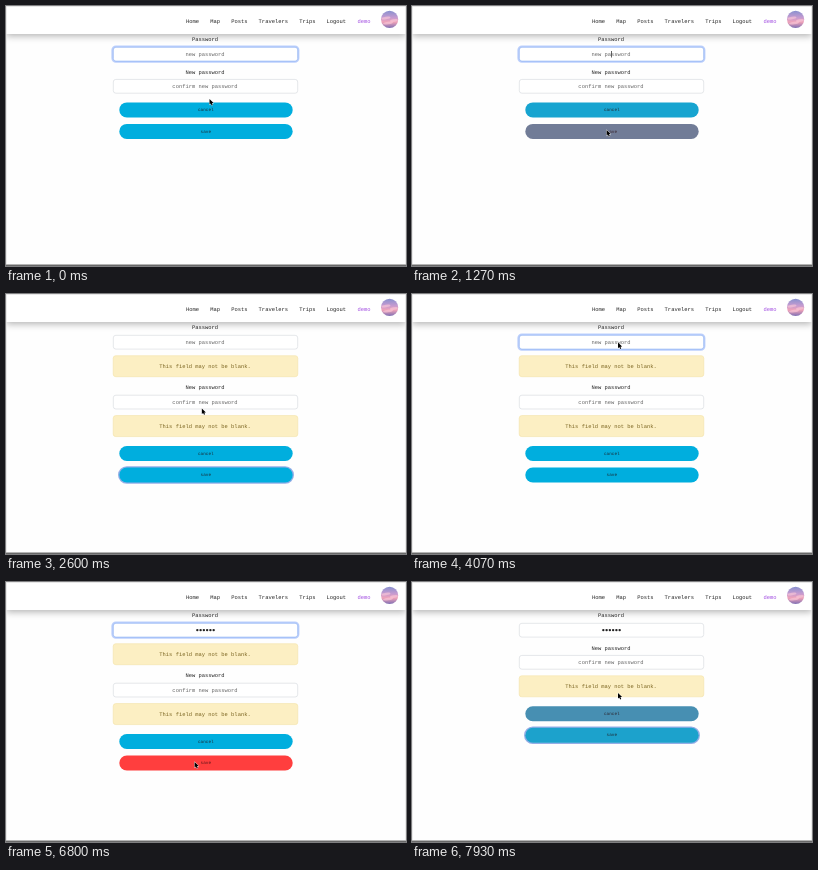
An HTML page with a canvas that plays this animation: 400 by 260 pixels, repeating every 8 s.

```html
<!DOCTYPE html>
<html lang="en">
<head>
<meta charset="utf-8">
<title>Change password</title>
<style>
  html, body { margin: 0; width: 100%; height: 100%; overflow: hidden; background: #fefefe; }
  canvas { display: block; width: 400px; height: 260px; }
</style>
</head>
<body>
<canvas id="stage"></canvas>
<script>
const canvas = document.getElementById('stage');
const ctx = canvas.getContext('2d');
const dpr = window.devicePixelRatio || 1;
canvas.width = 400 * dpr;
canvas.height = 260 * dpr;

const LOOP = 8000, TICK = 200 / 3, FADE = 150;
const MID = 199.5, CHAR = 3.27, ALERT_GAP = 27.8;
const BLUE = [0, 174, 222], RED = [255, 62, 62];
const FONT = '"Liberation Mono", "Courier New", monospace';

const NAV = [['Home', 180], ['Map', 204.3], ['Posts', 225.2], ['Travelers', 252.6],
  ['Trips', 293.2], ['Logout', 320.4], ['demo', 351.5]];

// time, x, y of the pointer tip
const POINTER = [
  [0, 203.5, 93], [920, 203.5, 93], [1080, 202, 102], [1260, 194.6, 124],
  [1730, 194.6, 122.4], [2560, 194.6, 122.4], [2930, 206, 48.6],
  [5760, 206, 48.6], [6060, 196.2, 157], [6270, 194, 162], [6600, 188.6, 180],
  [7500, 188.6, 180], [7900, 206, 111]
];
const KEYS = [4130, 4530, 4800, 5000, 5130, 5330];
const CARET = [[60, 530], [1060, 1590], [3130, 3660], [4130, 5790], [6260, 6790]];
const FIELD_FOCUS = [[-500, 1600], [3060, 7060]];
const SAVE_FOCUS = [[1600, 3060], [7060, 9000]];
const CANCEL_HOVER = [[1060, 1130], [6030, 6290], [7770, 7825]];
const SAVE_HOVER = [[1200, 1990], [6370, 7520], [7640, 7800]];

const clamp = v => Math.max(0, Math.min(1, v));
const inside = (spans, t) => spans.some(([a, b]) => t >= a && t < b);

function level(spans, t) {
  return Math.max(...spans.map(([a, b]) =>
    Math.min(clamp((t - a) / FADE), clamp((b - a) / FADE), clamp(1 - (t - b) / FADE))));
}

function mix(a, b, k) {
  return `rgb(${a.map((v, i) => Math.round(v + (b[i] - v) * k)).join(',')})`;
}

function pointerAt(t) {
  let i = 1;
  while (i < POINTER.length - 1 && t > POINTER[i][0]) i++;
  const [t0, x0, y0] = POINTER[i - 1], [t1, x1, y1] = POINTER[i];
  const k = clamp((t - t0) / (t1 - t0));
  return [x0 + (x1 - x0) * k, y0 + (y1 - y0) * k];
}

function box(x, y, w, h, r, fill, stroke, line = 0.6) {
  ctx.beginPath();
  ctx.roundRect(x, y, w, h, r);
  if (fill) {
    ctx.fillStyle = fill;
    ctx.fill();
  }
  if (stroke) {
    ctx.strokeStyle = stroke;
    ctx.lineWidth = line;
    ctx.stroke();
  }
}

function text(str, x, y, color, size = 5.45, align = 'center') {
  ctx.font = `${size}px ${FONT}`;
  ctx.textAlign = align;
  ctx.textBaseline = 'alphabetic';
  ctx.fillStyle = color;
  ctx.fillText(str, x, y);
}

function disc(x, y, r, color) {
  ctx.beginPath();
  ctx.arc(x, y, r, 0, Math.PI * 2);
  ctx.fillStyle = color;
  ctx.fill();
}

function avatar() {
  ctx.save();
  ctx.beginPath();
  ctx.arc(383.6, 13.4, 8.6, 0, Math.PI * 2);
  ctx.clip();
  const sky = ctx.createLinearGradient(0, 5, 0, 22);
  sky.addColorStop(0, '#8a91cf');
  sky.addColorStop(0.4, '#c79bd0');
  sky.addColorStop(0.65, '#f0a3b8');
  sky.addColorStop(1, '#7f70b4');
  ctx.fillStyle = sky;
  ctx.fillRect(374, 4, 20, 20);
  ctx.fillStyle = 'rgba(250,200,215,.65)';
  for (const [x, y, w] of [[380, 12, 4.5], [388, 14.5, 4], [382, 17, 5]]) {
    ctx.beginPath();
    ctx.ellipse(x, y, w, 1.3, -0.15, 0, Math.PI * 2);
    ctx.fill();
  }
  ctx.restore();
}

function header() {
  ctx.save();
  ctx.shadowColor = 'rgba(0,0,0,.3)';
  ctx.shadowBlur = 7 * dpr;
  ctx.shadowOffsetY = 2 * dpr;
  ctx.fillStyle = '#fff';
  ctx.fillRect(0, 0, 400, 28);
  ctx.restore();
  ctx.fillStyle = '#e2e2e2';
  ctx.fillRect(0, 0, 400, 0.8);
  NAV.forEach(([label, x], i) =>
    text(label, x, 17.3, i === NAV.length - 1 ? '#a04be0' : '#222', 5.45, 'left'));
  avatar();
}

function field(y, label, hint, focus, typed) {
  text(label, 199, y - 5.6, '#222');
  if (focus > 0) box(106.6, 40.6, 185.6, 15, 3.4, null, `rgba(120,160,250,${0.5 * focus})`, 2.4);
  box(107.3, y + 0.3, 184.4, 13.8, 2.6, '#fff',
    mix([212, 215, 220], [132, 170, 240], focus));
  for (let i = 0; i < typed; i++) {
    disc(MID + (i - (typed - 1) / 2) * CHAR, y + 7.1, 1.2, '#222');
  }
  if (!typed) text(hint, MID - 0.5, y + 8.9, '#666');
}

function alertBox(y) {
  box(107.2, y + 0.3, 184.6, 21, 2.6, '#fcefc3', '#f4e2a8');
  text('This field may not be blank.', 199, y + 12.5, '#7a6420');
}

function button(y, label, hover, focus) {
  if (focus > 0) box(112.9, y - 0.4, 174.2, 15.8, 7.9, null, `rgba(80,120,215,${0.6 * focus})`, 1.8);
  box(113.3, y, 173.4, 15, 7.5, mix(BLUE, RED, hover));
  text(label, 199.8, y + 8.7, mix([25, 45, 55], [90, 20, 25], hover), 4.35);
}

function pointer(x, y) {
  ctx.beginPath();
  [[0, 0], [0, 5.6], [1.3, 4.5], [2.2, 6.4], [3.2, 5.9], [2.4, 4.1], [4.1, 4]]
    .forEach(([dx, dy]) => ctx.lineTo(x + dx, y + dy));
  ctx.closePath();
  ctx.lineJoin = 'round';
  ctx.strokeStyle = 'rgba(255,255,255,.85)';
  ctx.lineWidth = 0.9;
  ctx.stroke();
  ctx.fillStyle = '#000';
  ctx.fill();
}

function draw(t) {
  const typed = KEYS.filter(k => t >= k - 5).length;
  const firstError = t >= 1990 && t < 7520;
  const secondError = t >= 1990;

  ctx.setTransform(dpr, 0, 0, dpr, 0, 0);
  ctx.textRendering = 'geometricPrecision';
  ctx.fillStyle = '#fefefe';
  ctx.fillRect(0, 0, 400, 260);

  header();

  let y = 41;
  field(y, 'Password', 'new password', level(FIELD_FOCUS, t), typed);
  if (inside(CARET, t)) {
    ctx.fillStyle = '#222';
    ctx.fillRect(MID - 0.4 + typed * CHAR / 2, 45, 0.7, 6.5);
  }
  if (firstError) {
    alertBox(61.4);
    y += ALERT_GAP;
  }
  y += 32.1;
  field(y, 'New password', 'confirm new password', 0, 0);
  if (secondError) {
    alertBox(y + 20.4);
    y += ALERT_GAP;
  }
  button(y + 23.3, 'cancel', level(CANCEL_HOVER, t), 0);
  button(y + 44.8, 'save', level(SAVE_HOVER, t), level(SAVE_FOCUS, t));

  ctx.fillStyle = '#dcdcdc';
  ctx.fillRect(0, 0, 0.6, 260);
  ctx.fillRect(399.4, 0, 0.6, 260);
  ctx.fillStyle = '#b5b5b5';
  ctx.fillRect(0, 258, 400, 1);
  ctx.fillStyle = '#686868';
  ctx.fillRect(0, 259, 400, 1);

  pointer(...pointerAt(t));
}

const start = performance.now();
function frame() {
  const t = (performance.now() - start) % LOOP;
  draw(Math.floor((t + 4) / TICK) * TICK);
  requestAnimationFrame(frame);
}
frame();
</script>
</body>
</html>
```
